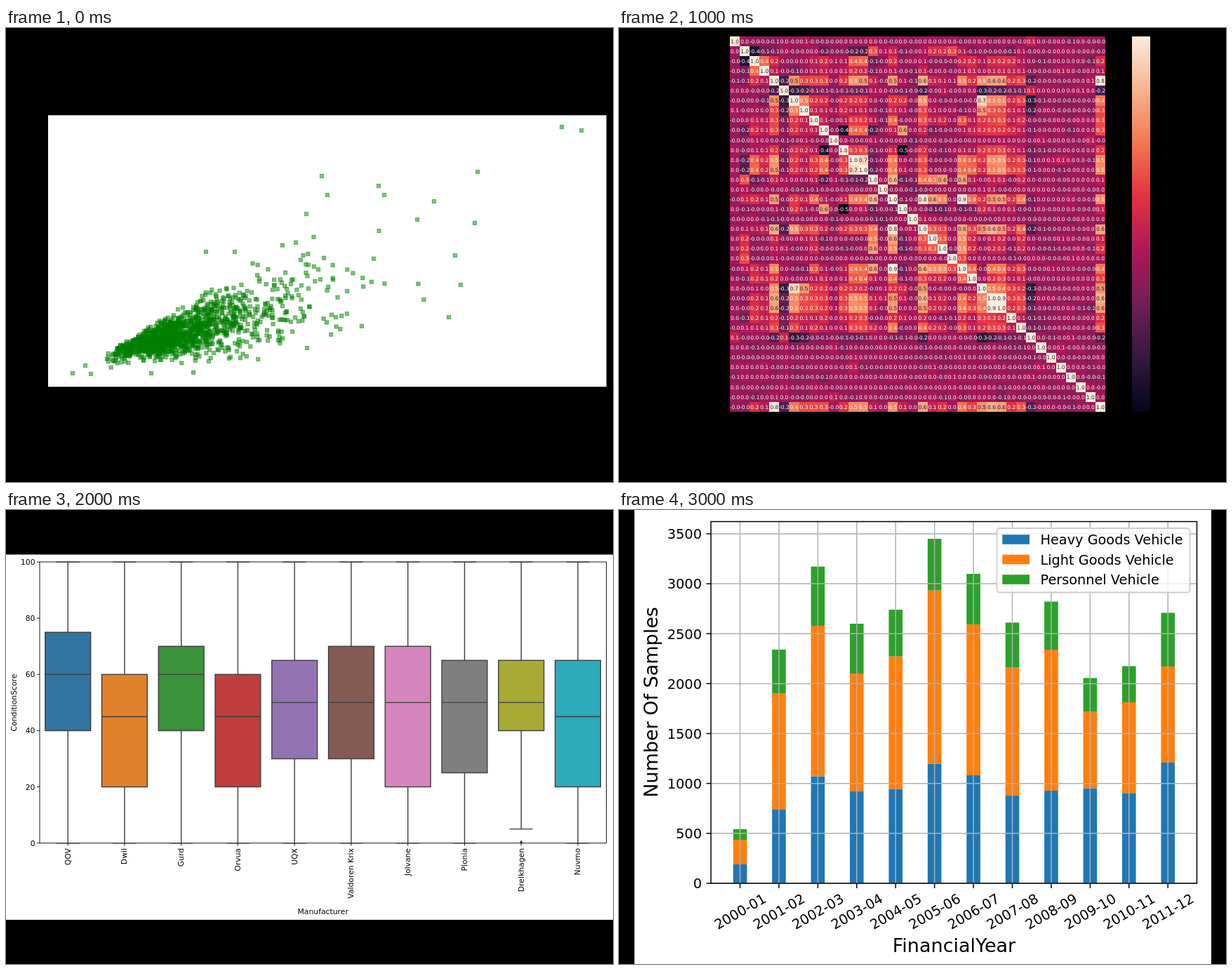
An HTML page that plays this animation: 865x647 px, repeating every 4000 ms.

```html
<!DOCTYPE html>
<html lang="en">
<head>
<meta charset="utf-8">
<title>Charts</title>
<style>
html, body { margin: 0; width: 100%; height: 100%; overflow: hidden; background: #000; }
svg { display: block; width: 865px; height: 647px; font-family: "DejaVu Sans", Verdana, sans-serif; }
</style>
</head>
<body>
<svg id="stage" viewBox="0 0 865 647"></svg>
<script>
const stage = document.getElementById('stage');

function add(parent, tag, attrs, text) {
  const el = document.createElementNS('http://www.w3.org/2000/svg', tag);
  for (const key in attrs) el.setAttribute(key, attrs[key]);
  if (text !== undefined) el.textContent = text;
  parent.appendChild(el);
  return el;
}
const rect = (g, x, y, width, height, fill, more) =>
  add(g, 'rect', { x, y, width, height, fill, ...more });
const line = (g, x1, y1, x2, y2, stroke, width) =>
  add(g, 'line', { x1, y1, x2, y2, stroke, 'stroke-width': width });
function label(g, text, x, y, size, anchor = 'middle', angle = 0, fill = '#000', drop = 0) {
  return add(g, 'text', {
    transform: `translate(${x} ${y}) rotate(${angle})`, y: drop,
    'font-size': size, 'text-anchor': anchor, fill
  }, text);
}

function seeded(seed) {
  return () => {
    seed = (seed + 0x6D2B79F5) | 0;
    let t = Math.imul(seed ^ (seed >>> 15), 1 | seed);
    t = (t + Math.imul(t ^ (t >>> 7), 61 | t)) ^ t;
    return ((t ^ (t >>> 14)) >>> 0) / 4294967296;
  };
}
function gaussian(seed) {
  const rnd = seeded(seed);
  return () => Math.sqrt(-2 * Math.log(1 - rnd())) * Math.cos(2 * Math.PI * rnd());
}

// Scatter: a widening cloud plus the most isolated points
function scatter(g) {
  rect(g, 60, 124.3, 795.6, 387, '#fff');
  const marks = add(g, 'g', { fill: '#008000', 'fill-opacity': 0.5, stroke: '#008000', 'stroke-opacity': 0.5 });
  const mark = (x, y) => add(marks, 'rect', { x: x - 2.6, y: y - 2.6, width: 5.2, height: 5.2 });
  const normal = gaussian(12);
  let count = 0;
  while (count < 1350) {
    const x = 60 + 190 * Math.exp(0.36 * normal());
    const y = 452 - 0.27 * (x - 190) + normal() * (8 + 0.13 * Math.max(0, x - 180));
    const top = Math.max(275, 422 - 0.62 * (x - 210));
    const bottom = 486 - 0.06 * (x - 160);
    if (x < 143 || x > 600 || y < top || y > bottom) continue;
    mark(x, y);
    count++;
  }
  const lone = [
    [792, 141], [820, 146], [672, 205], [450, 211], [458, 238], [531, 225], [539, 238],
    [610, 247], [586, 273], [668, 278], [428, 265], [285, 319], [326, 319], [640, 324],
    [648, 366], [631, 412], [95, 492], [113, 481], [121, 493], [207, 492], [267, 491]
  ];
  lone.forEach(p => mark(...p));
}

const ramp = ['#03051a', '#35193e', '#701f57', '#ad1759', '#e13342', '#f37651', '#f6b48f', '#faebdd'];
const channels = hex => [1, 3, 5].map(i => parseInt(hex.slice(i, i + 2), 16));
// The colour scale runs from -0.5 to 0.8
function rampColor(value) {
  const p = Math.max(0, Math.min(1, (value + 0.5) / 1.3)) * 7;
  const i = Math.min(6, Math.floor(p));
  const a = channels(ramp[i]), b = channels(ramp[i + 1]);
  return a.map((c, k) => Math.round(c + (b[k] - c) * (p - i)));
}
function luminance(rgb) {
  const [r, g, b] = rgb.map(c => c / 255).map(c => c <= 0.03928 ? c / 12.92 : ((c + 0.055) / 1.055) ** 2.4);
  return 0.2126 * r + 0.7152 * g + 0.0722 * b;
}

// Each factor ties variables together: weight, then its members
const factors = {
  age: [[0.88, 6, 25], [0.56, 4, 7, 19, 26, 27, 37], [0.23, 8, 9, 11, 12, 13, 16, 17, 28, 29], [-0.36, 5, 30]],
  ground: [[0.82, 12, 13], [0.45, 2, 4, 9, 16, 23, 24, 26, 27, 37], [0.25, 3, 8, 11, 19, 28, 29], [-0.25, 1, 14]],
  rooms: [[0.85, 14, 16, 23], [0.6, 19, 20, 21], [0.25, 1, 4, 8, 24, 26, 27, 29, 37], [-0.15, 9, 17]],
  cellar: [[0.72, 9, 17], [-0.75, 11]]
};
const closePairs = [[4, 37, 0.8], [26, 27, 0.9], [1, 2, -0.4], [2, 3, 0.4], [1, 22, 0.3], [22, 23, 0.3]];

function correlations(size) {
  const noise = gaussian(5);
  const m = Array.from({ length: size }, () => Array(size).fill(0));
  const set = (i, j, r) => { m[i][j] = m[j][i] = r; };
  for (const tiers of Object.values(factors)) {
    const load = Array(size).fill(0);
    tiers.forEach(([weight, ...members]) => members.forEach(i => { load[i] = weight; }));
    load.forEach((a, i) => load.forEach((b, j) => { m[i][j] += a * b; }));
  }
  for (let i = 0; i < size; i++) {
    m[i][i] = 1;
    for (let j = i + 1; j < size; j++) set(i, j, m[i][j] + 0.035 * noise());
  }
  closePairs.forEach(p => set(...p));
  return m;
}

function heatmap(g) {
  const x0 = 158, y0 = 12, size = 38, cell = 535 / size;
  const cells = add(g, 'g', { 'shape-rendering': 'crispEdges' });
  const notes = add(g, 'g', {});
  correlations(size).forEach((row, i) => row.forEach((r, j) => {
    const rgb = rampColor(r), x = x0 + j * cell, y = y0 + i * cell;
    rect(cells, x, y, cell, cell, `rgb(${rgb})`);
    label(notes, Math.min(1, r).toFixed(1), x + cell / 2, y + cell / 2 + 2.7, 7.5, 'middle', 0,
      luminance(rgb) > 0.408 ? '#262626' : '#fff');
  }));
  const fade = add(add(g, 'defs', {}), 'linearGradient', { id: 'ramp', x1: 0, y1: 1, x2: 0, y2: 0 });
  ramp.forEach((c, i) => add(fade, 'stop', { offset: i / 7, 'stop-color': c }));
  rect(g, 731, 12, 26, 535, 'url(#ramp)');
}

function boxes(g) {
  const ink = '#3d3d3d';
  const yOf = v => 474.7 - v * 4.006;
  // name, colour, quartiles, lower whisker
  const makers = [
    ['QOV', '#3274a1', 40, 60, 75], ['Dwil', '#e1812c', 20, 45, 60],
    ['Gurd', '#3a923a', 40, 60, 70], ['Orvua', '#c03d3e', 20, 45, 60],
    ['UQX', '#9372b2', 30, 50, 65], ['Valdoren Krix', '#845b53', 30, 50, 70],
    ['Jolvane', '#d684bd', 20, 50, 70], ['Plonia', '#7f7f7f', 25, 50, 65],
    ['Drelkhagen', '#a9aa35', 40, 50, 65, 5], ['Nuvmo', '#2eabb8', 20, 45, 65]
  ];
  rect(g, 0, 63.5, 865, 520.5, '#fff');
  rect(g, 48, 74, 807.5, 400.7, 'none', { stroke: '#000', 'stroke-width': 0.9 });
  for (let v = 0; v <= 100; v += 20) {
    line(g, 44, yOf(v), 48, yOf(v), '#000', 0.9);
    label(g, v, 41.5, yOf(v) + 4, 10.8, 'end');
  }
  makers.forEach(([name, color, low, mid, high, min = 0], i) => {
    const x = 88.2 + i * 80.75;
    line(g, x, yOf(high), x, yOf(100), ink, 1.4);
    line(g, x, yOf(low), x, yOf(min), ink, 1.4);
    [min, 100].forEach(v => line(g, x - 16.5, yOf(v), x + 16.5, yOf(v), ink, 1.4));
    rect(g, x - 32.4, yOf(high), 64.8, yOf(low) - yOf(high), color, { stroke: ink, 'stroke-width': 1.4 });
    line(g, x - 32.4, yOf(mid), x + 32.4, yOf(mid), ink, 1.4);
    line(g, x, 474.7, x, 478.5, '#000', 0.9);
    label(g, name, x, 482, 10.8, 'end', -90, '#000', 3.5);
    if (min) add(g, 'path', { d: `M${x} 470.6l2.2 3.2-2.2 3.2-2.2-3.2z`, fill: ink });
  });
  label(g, 'ConditionScore', 15, 274.5, 10.8, 'middle', -90);
  label(g, 'Manufacturer', 451.7, 576, 10.8);
}

function bars(g) {
  const colors = ['#1f77b4', '#ff7f0e', '#2ca02c'];
  const kinds = ['Heavy Goods Vehicle', 'Light Goods Vehicle', 'Personnel Vehicle'];
  const yOf = v => 532 - v * 0.1423;
  const xOf = i => 172.5 + i * 55.43;
  // running totals per year
  const totals = [
    [190, 435, 543], [738, 1904, 2340], [1072, 2579, 3172], [921, 2101, 2600],
    [945, 2273, 2740], [1198, 2934, 3450], [1082, 2593, 3099], [878, 2164, 2611],
    [928, 2340, 2821], [952, 1718, 2056], [900, 1813, 2175], [1209, 2171, 2709]
  ];
  rect(g, 22, 0, 822, 647, '#fff');
  totals.forEach((stack, i) => stack.forEach((v, k) => {
    const base = k ? stack[k - 1] : 0;
    rect(g, xOf(i) - 9.8, yOf(v), 19.6, yOf(base) - yOf(v), colors[k]);
  }));
  totals.forEach((_, i) => {
    const x = xOf(i), two = n => String(n).padStart(2, '0');
    line(g, x, 16.5, x, 532, '#b0b0b0', 1.5);
    line(g, x, 532, x, 539, '#000', 1.5);
    label(g, `20${two(i)}-${two(i + 1)}`, x, 572, 19.4, 'middle', -30, '#000', 7);
  });
  for (let v = 0; v <= 3500; v += 500) {
    line(g, 131, yOf(v), 823.5, yOf(v), '#b0b0b0', 1.5);
    line(g, 124.5, yOf(v), 131, yOf(v), '#000', 1.5);
    label(g, v, 118, yOf(v) + 7.3, 19.4, 'end');
  }
  rect(g, 131, 16.5, 692.5, 515.5, 'none', { stroke: '#000', 'stroke-width': 1.5 });
  rect(g, 538.5, 26, 275, 91.5, '#fff', { rx: 4, 'fill-opacity': 0.8, stroke: '#ccc', 'stroke-width': 1.8 });
  kinds.forEach((kind, k) => {
    const y = 42 + k * 28.5;
    rect(g, 546.3, y - 6.8, 38.7, 13.6, colors[k]);
    label(g, kind, 600.5, y + 7, 19.3, 'start');
  });
  label(g, 'Number Of Samples', 54.5, 274, 27, 'middle', -90);
  label(g, 'FinancialYear', 477.5, 630, 27);
}

const scenes = [scatter, heatmap, boxes, bars].map(draw => {
  const g = add(stage, 'g', { display: 'none' });
  draw(g);
  return g;
});

const start = performance.now();
let shown = -1;
function show(time) {
  const now = Math.floor((time % 4000) / 1000);
  if (now === shown) return;
  scenes.forEach((g, i) => g.setAttribute('display', i === now ? 'inline' : 'none'));
  shown = now;
}
function tick() {
  show(performance.now() - start);
  requestAnimationFrame(tick);
}
show(0);
requestAnimationFrame(tick);
</script>
</body>
</html>
```
